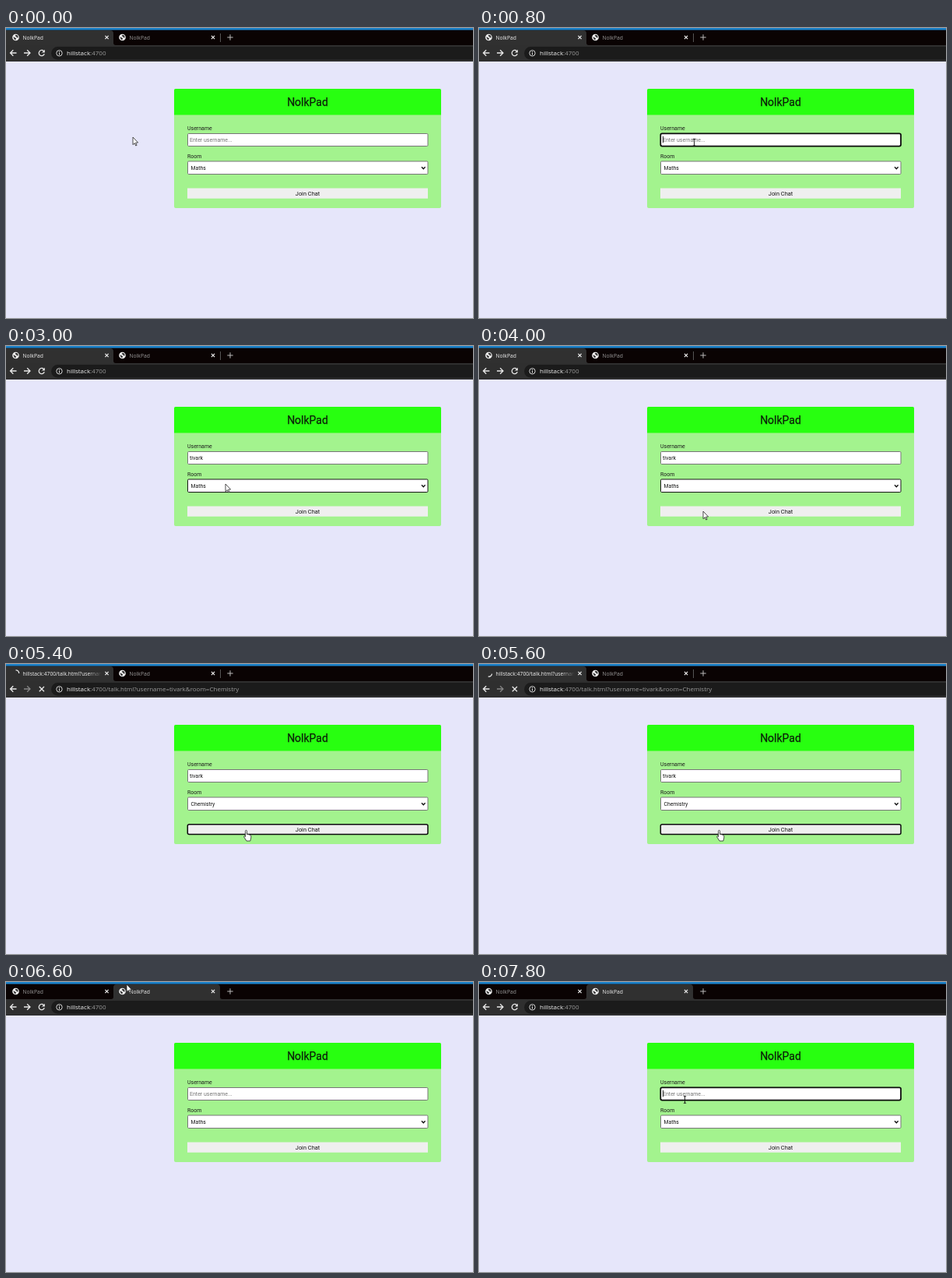
These frames come from a looping animation (600x372 px, 8 s). An HTML page:

```html
<!DOCTYPE html>
<html lang="en">
<head>
<meta charset="utf-8">
<title>NolkPad</title>
<style>
  html, body { margin: 0; width: 100%; height: 100%; overflow: hidden; background: #e6e6fa; }
  svg { display: block; width: 100%; height: 100%; }
  text { font-family: Roboto, Arial, sans-serif; font-size: 7px; fill: #1c1c1c; white-space: pre; }
  .ui { font-family: "Open Sans", "Noto Sans", sans-serif; font-size: 6.75px; }
  .url { font-size: 8px; fill: #f0f0f0; }
  .dim { fill: #9b9b9b; }
  .h1 { font-size: 14px; fill: #0c200a; stroke: #0c200a; stroke-width: .25; }
  .h2 { font-size: 8.1px; font-weight: 500; fill: #10240f; }
  .mid { text-anchor: middle; }
  .btn { font-size: 7.4px; fill: #111; }
  .hint { fill: #757575; }
  .link { fill: #1a1ae0; }
  .box { fill: #fff; stroke: #767676; stroke-width: 1; }
  .ring { fill: none; stroke: #0b0b0b; stroke-width: 1.7; }
  .line { fill: none; stroke: #e8e8e8; stroke-width: 1.3; }
  .faint { stroke: #858585; }
</style>
</head>
<body>
<svg viewBox="0 0 600 372" preserveAspectRatio="none">
  <defs>
    <linearGradient id="fade" gradientUnits="userSpaceOnUse" x1="106" x2="123">
      <stop offset="0" stop-color="#f2f2f2"/>
      <stop offset="1" stop-color="#f2f2f2" stop-opacity="0"/>
    </linearGradient>
    <g id="globe">
      <circle r="4.3" fill="#f1f1f1"/>
      <path d="M-3.2-.8 L-1 .2 L.6 1.6 L-.4 3.4 L-2 2.2 Z M-.2-3.2 L2.6-2.4 L3.2 .4 L1.2 .2 L.6-1.2 L-.8-1.4 Z" fill="#333"/>
    </g>
    <path id="cross" d="M-2.1-2.1 L2.1 2.1 M2.1-2.1 L-2.1 2.1"/>
    <g id="scroll">
      <rect width="10" height="110" fill="#f0f0f0"/>
      <path d="M3 6 L5 3.6 L7 6 Z M3 104.5 L5 106.9 L7 104.5 Z" fill="#969696"/>
    </g>
  </defs>

  <rect width="600" height="372" fill="#e6e6fa"/>

  <!-- Browser frame -->
  <rect width="600" height="23" fill="#0a0303"/>
  <rect width="600" height="2.6" fill="#1c82ca"/>
  <path id="hover" d="M138 22 V6 q0-3 3-3 H272 q3 0 3 3 V22 Z" fill="#171717"/>
  <path id="tab1" d="M0 23 V3 H134 q4 0 4 4 V19 q0 3 3 3 V23 Z" fill="#303030"/>
  <path id="tab2" d="M135 23 V22 q3 0 3-3 V7 q0-4 4-4 H271 q4 0 4 4 V19 q0 3 3 3 V23 Z" fill="#303030"/>
  <path id="split" d="M275.5 7 V18" stroke="#555" stroke-width="1"/>
  <rect y="22" width="600" height="21" fill="#2f2f2f"/>
  <path d="M600 24 H66.500 a8.400 8.400 0 0 0 0 16.800 H600 Z" fill="#1b1b1b"/>

  <use id="icon1" href="#globe" x="12.500" y="12"/>
  <path id="spin" class="line" d="M12.500 7.800 A4.200 4.200 0 0 1 16.700 12"/>
  <text id="title1" class="ui" x="21.500" y="14.600">NolkPad</text>
  <text id="title2" class="ui" x="158.500" y="14.600">NolkPad</text>
  <use href="#globe" x="149.500" y="12"/>
  <use href="#cross" class="line" x="129.500" y="12"/>
  <use href="#cross" class="line" x="266" y="12"/>
  <path class="line" d="M284.300 12 H291.700 M288 8.300 V15.700" style="stroke:#bbb;stroke-width:1"/>

  <path class="line" d="M13.500 32 H5.500 M9.300 28.200 L5.500 32 L9.300 35.800"/>
  <path id="next" class="line" d="M23 32 H31 M27.200 28.200 L31 32 L27.200 35.800"/>
  <g id="reload">
    <path class="line" d="M48.600 29.700 A3.600 3.600 0 1 0 49.300 33.200"/>
    <path d="M49.900 27.800 V31.600 H46.100 Z" fill="#e8e8e8"/>
  </g>
  <path id="stop" class="line" d="M42.800 29 L49 35.200 M49 29 L42.800 35.200"/>
  <circle cx="68.500" cy="32.300" r="3.700" class="line" style="stroke-width:.9"/>
  <path d="M68.500 31.700 V34.500 M68.500 29.900 V30.900" class="line" style="stroke-width:1"/>
  <text class="ui url" x="78" y="35.200">hillstack<tspan id="path" class="dim"></tspan></text>

  <!-- Join form -->
  <g id="join">
    <rect x="216" y="78" width="343" height="153" rx="2" fill="#a3f38e"/>
    <path d="M216 111.500 V80 q0-2 2-2 H557 q2 0 2 2 V111.500 Z" fill="#28ff10"/>
    <text class="h1 mid" x="387.500" y="99.700">NolkPad</text>
    <text x="233" y="131">Username</text>
    <rect class="box" x="233.500" y="135.500" width="308.500" height="16" rx="1.200"/>
    <text id="hint" class="hint" x="236" y="145.500">Enter username...</text>
    <text id="user" x="236" y="145.500"></text>
    <rect id="caret" y="138.800" width=".9" height="8.500" fill="#111"/>
    <rect id="ring1" class="ring" x="233.300" y="135.300" width="308.700" height="16.300" rx="2"/>
    <text x="233" y="166.700">Room</text>
    <rect id="select" class="box" x="233.500" y="171" width="308.500" height="16.500" rx="1.200"/>
    <text id="room" x="237.600" y="182" style="font-size:6.800px;fill:#111"></text>
    <path d="M534 178.300 L536.300 180.700 L538.600 178.300" fill="none" stroke="#111" stroke-width="1.400"/>
    <rect x="233" y="205.500" width="309" height="13.200" fill="#efefef"/>
    <rect id="ring2" class="ring" x="233.300" y="205.700" width="308.700" height="12.700" rx="2" style="stroke-width:1.500"/>
    <text class="btn mid" x="387.500" y="214.600">Join Chat</text>
  </g>

  <!-- Chat room -->
  <g id="chat">
    <rect x="216" y="78" width="343" height="175" rx="2" fill="#a3f38e"/>
    <path d="M216 108 V80 q0-2 2-2 H557 q2 0 2 2 V108 Z" fill="#3af216"/>
    <text class="h1" x="222" y="97.700">NolkPad</text>
    <text class="link" x="506" y="95" style="font-size:7.450px">Leave Room</text>
    <rect x="216" y="108" width="76" height="110" fill="#9fffac"/>
    <rect x="302" y="108" width="247" height="110" fill="#ccf1c4"/>
    <use href="#scroll" x="292" y="108"/>
    <use href="#scroll" x="549" y="108"/>
    <text class="h2" x="224" y="123.600">Room Name:</text>
    <rect x="224" y="132" width="59" height="19" fill="#8ee59a"/>
    <text class="h2" x="228.500" y="144.500" style="font-size:8.600px">Chemistry</text>
    <text class="h2" x="224" y="167.400">Users</text>
    <text x="224" y="187" style="font-size:7.200px">tivark</text>
    <rect x="315" y="120" width="222" height="28" rx="2" fill="#e6e6fa"/>
    <text class="link" x="319" y="131.200" style="font-size:6.400px;font-weight:700">NolkPad Bot</text>
    <text x="357" y="131.200" style="font-size:6.400px;fill:#555">4:47 pm</text>
    <text x="319" y="142" style="font-size:6.800px">Welcome to NolkReed!</text>
    <rect class="box" x="229.500" y="227.500" width="277.500" height="16.500" rx="1"/>
    <text class="hint" x="231.800" y="238.200" style="font-size:6.150px">Enter Message</text>
    <rect x="507.500" y="227" width="39.500" height="17.500" fill="#efefef"/>
    <path d="M521 232.200 L513.500 236.500 L515.600 237.400 L519.500 233.900 L516.500 237.900 L519.600 239.200 Z M516 238 V240 L517.300 238.600 Z" fill="#111"/>
    <text class="btn" x="523" y="238.700">Send</text>
  </g>

  <!-- Pointers -->
  <g id="pointer">
    <path id="arrow" d="M0 0 V9.700 L2.200 7.700 L3.700 11 L5.100 10.400 L3.600 7.200 L6.600 7 Z" fill="#fff" stroke="#222" stroke-width=".8"/>
    <path id="beam" d="M-1.700-4.300 H1.700 M0-4.300 V4.300 M-1.700 4.300 H1.700" fill="none" stroke="#111" stroke-width=".9"/>
    <path id="hand" d="M-1 1 q0-1.200 1-1.200 t1 1.200 V5 q1.800-.6 2 .5 q1.600-.5 1.800 .6 q1.500-.2 1.500 1 V9.500 L5.300 13.500 H.5 L-2.600 8.600 q-.6-1.400 .5-1.500 L-1 8.200 Z" fill="#fff" stroke="#222" stroke-width=".8"/>
  </g>
</svg>
<script>
const STEP = 200, LOOP = 8000;
const NAME = "tivark", PORT = ":4700";
const QUERY = "/talk.html?username=" + NAME + "&room=Chemistry";

// time, x, y, pointer shape
const moves = [
  [0, 163, 140, "arrow"], [200, 184, 143, "arrow"], [400, 222, 146, "arrow"],
  [600, 262, 147, "beam"], [800, 276.5, 146.700, "beam"],
  [2400, 277, 149, "beam"], [2600, 279, 160, "arrow"], [2800, 281, 172, "arrow"],
  [3000, 282, 177, "arrow"], [3400, 282, 179, "arrow"],
  [3600, 284, 191, "arrow"], [3800, 286, 203, "arrow"], [4000, 288, 212, "arrow"],
  [4200, 289, 215, "arrow"], [4600, 292, 213, "hand"], [4800, 299, 213, "hand"],
  [5000, 306, 213, "hand"], [5200, 308.5, 213.5, "hand"],
  [5800, 304, 196, "arrow"], [6000, 262, 112, "arrow"], [6200, 188, 32, "arrow"],
  [6400, 155, 3, "arrow"], [6800, 159, 5, "arrow"], [7000, 172, 10, "arrow"],
  [7200, 226, 92, "arrow"], [7400, 264.5, 151, "beam"]
];

const $ = id => document.getElementById(id);
const show = (id, on) => { $(id).style.display = on ? "" : "none"; };
const put = (id, text) => { if ($(id).textContent !== text) $(id).textContent = text; };

function draw(time) {
  const t = Math.floor(time % LOOP / STEP) * STEP;
  const within = (from, to) => t >= from && t < to;
  const second = t >= 6600;
  const loading = within(5400, 5800);
  const chat = within(5800, 6600);
  const typing = within(800, 3000) || t >= 7800;
  const typed = second ? 0 : Math.max(0, Math.min(NAME.length, (t - 1000) / STEP));

  show("tab1", !second);
  show("tab2", second);
  show("split", !second);
  show("hover", within(6400, 6600));
  show("icon1", !loading);
  show("spin", loading);
  $("spin").setAttribute("transform", `rotate(${(t - 5400) * .5} 12.5 12)`);
  put("title1", loading ? "hillstack" + PORT + QUERY.slice(0, 19) : "NolkPad");
  $("title1").style.fill = second ? "#9b9b9b" : loading ? "url(#fade)" : "#f2f2f2";
  $("title2").style.fill = second ? "#f2f2f2" : "#9b9b9b";
  $("next").classList.toggle("faint", loading || chat);
  show("reload", !loading);
  show("stop", loading);
  put("path", PORT + (loading || chat ? QUERY : ""));

  show("join", !chat);
  show("chat", chat);
  show("hint", !typed);
  put("user", NAME.slice(0, typed));
  show("ring1", typing);
  show("caret", typing);
  if (typing) $("caret").setAttribute("x", 236 + (typed ? $("user").getComputedTextLength() + .3 : 0));
  put("room", within(4400, 6600) ? "Chemistry" : "Maths");
  $("select").style.stroke = within(3000, 5200) ? "#161616" : "";
  show("ring2", within(5200, 5800));

  const [, x, y, shape] = moves.filter(m => m[0] <= t).pop();
  $("pointer").setAttribute("transform", `translate(${x} ${y})`);
  for (const kind of ["arrow", "beam", "hand"]) show(kind, kind === shape);
}

const start = performance.now();
function tick() {
  draw(performance.now() - start);
  requestAnimationFrame(tick);
}
tick();
</script>
</body>
</html>
```
